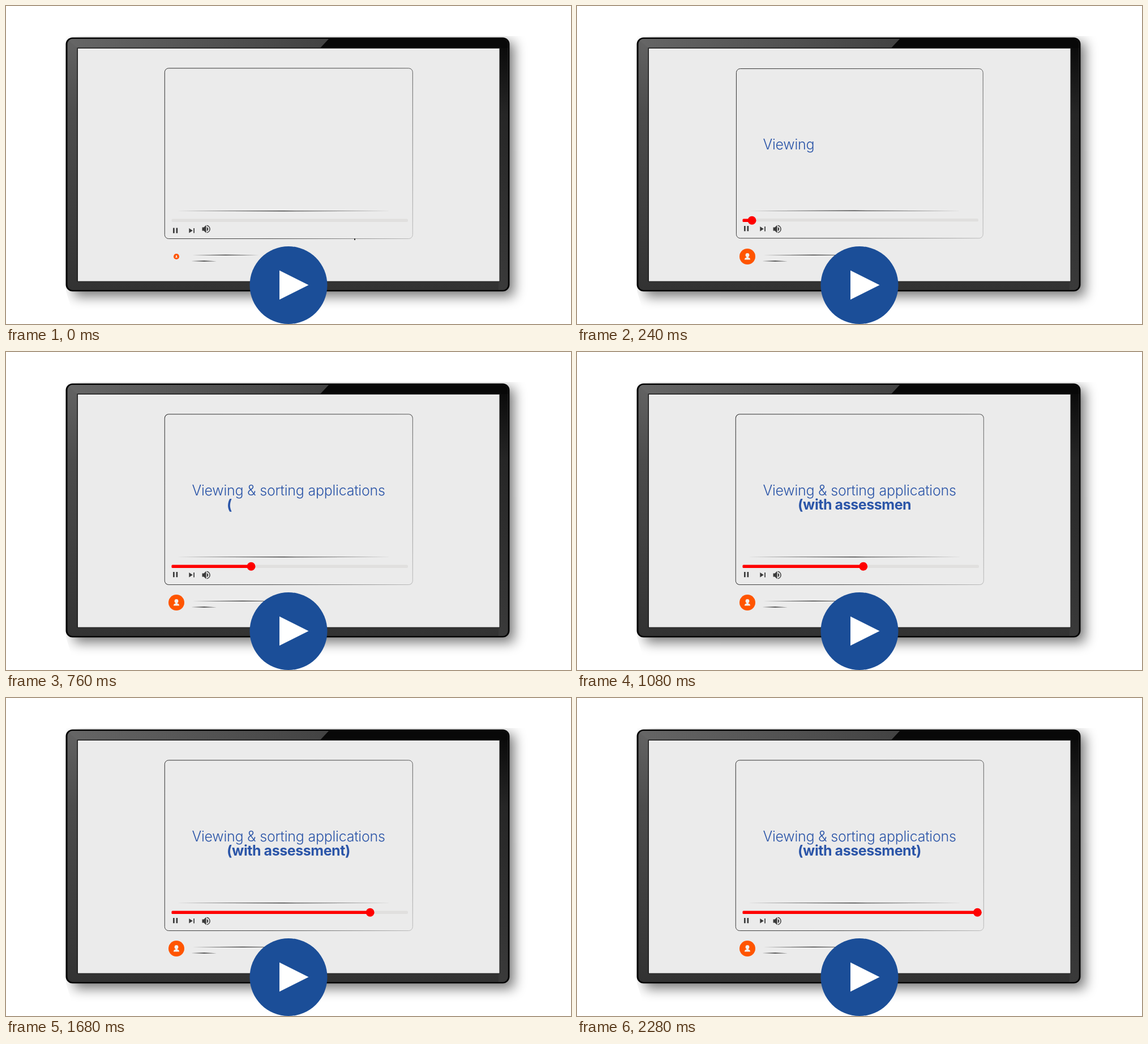
These frames come from a looping animation (998 by 561 pixels, 2.52 s). An HTML page:

```html
<!DOCTYPE html>
<html lang="en">
<head>
<meta charset="utf-8">
<title>Video player</title>
<style>
  html, body { margin: 0; width: 100%; height: 100%; overflow: hidden; background: #fff; }
  svg { display: block; width: 100%; height: 100%; }
  text { font-family: Inter, "Open Sans", sans-serif; font-size: 25px; fill: #2b55a8; text-anchor: middle; white-space: pre; }
  .title { font-weight: 300; letter-spacing: -.25px; }
  .sub { font-weight: 700; letter-spacing: -.45px; }
  .rest { visibility: hidden; }
  .icon { fill: #3a3a3a; }
  .rule { fill: #2a2a2a; }
</style>
</head>
<body>
<svg viewBox="0 0 998 561">
  <defs>
    <linearGradient id="bezel" x1="0" y1="0" x2="0" y2="1">
      <stop offset="0" stop-color="#636363"/>
      <stop offset=".3" stop-color="#4c4c4c"/>
      <stop offset="1" stop-color="#323232"/>
    </linearGradient>
    <linearGradient id="side" x1="0" y1="0" x2="0" y2="1">
      <stop offset="0" stop-color="#080808"/>
      <stop offset=".3" stop-color="#262626"/>
      <stop offset="1" stop-color="#3a3a3a"/>
    </linearGradient>
    <linearGradient id="top" x1="0" y1="0" x2="1" y2="0">
      <stop offset="0" stop-color="#666"/>
      <stop offset="1" stop-color="#424242"/>
    </linearGradient>
    <linearGradient id="edge" gradientUnits="userSpaceOnUse" x1="300" y1="110" x2="718" y2="411">
      <stop offset="0" stop-color="#303030"/>
      <stop offset=".6" stop-color="#4a4a4a"/>
      <stop offset="1" stop-color="#bdbdbd"/>
    </linearGradient>
    <filter id="soft" x="-10%" y="-15%" width="120%" height="130%"><feGaussianBlur stdDeviation="11"/></filter>
    <clipPath id="below"><path d="M106 53H940V545H118L106 503Z"/></clipPath>
    <clipPath id="body"><rect x="108.500" y="58" width="778" height="443" rx="9"/></clipPath>
  </defs>

  <g clip-path="url(#below)">
    <rect x="120" y="64" width="777" height="448" fill="#000" opacity=".55" filter="url(#soft)"/>
  </g>

  <!-- monitor -->
  <rect x="105.500" y="55.500" width="784" height="448" rx="12" fill="#050505"/>
  <g clip-path="url(#body)">
    <rect x="108" y="58" width="779" height="443" fill="url(#bezel)"/>
    <rect x="870" y="58" width="18" height="443" fill="url(#side)"/>
    <path d="M108 58H570L555 74H126Z" fill="url(#top)"/>
    <path d="M570 58H888V74H555Z" fill="#080808"/>
  </g>
  <rect x="125.500" y="73.500" width="747" height="413" fill="#1c1c1c"/>
  <rect x="127" y="75" width="744.500" height="410.500" fill="#ebebeb"/>

  <!-- player -->
  <g id="panel">
    <rect x="280.300" y="109.800" width="438" height="300.700" rx="7" fill="none" stroke="url(#edge)"/>
    <path class="rule" d="M301 361.700L490 361.100L680 361.700L490 362.300Z"/>
    <rect x="292.500" y="375.500" width="417.500" height="5.500" rx="2" fill="#e0dfde"/>
  </g>
  <rect id="tip" x="615" y="410" width="2" height="3" fill="#333"/>

  <g class="icon">
    <path id="pause" d="M295 388h2.700v9.300h-2.700zM300.500 388h2.700v9.300h-2.700z"/>
    <path id="next" d="M323.300 389l6.500 4.200-6.500 4.200zM331.200 389h1.700v8.400h-1.700z"/>
    <path d="M346.500 390.500h3l4-4v14l-4-4h-3z"/>
    <path d="M354.800 390a3.700 3.700 0 0 1 0 7z"/>
    <path d="M354.800 387.200a6.400 6.400 0 0 1 0 12.600" fill="none" stroke="#3a3a3a" stroke-width="1.500"/>
  </g>

  <g id="avatar">
    <circle r="14" fill="#ff5500"/>
    <circle cy="-2.500" r="3.400" fill="#f2f2f2"/>
    <path d="M-5 5.500C-5 2.500-3 2-1.500 1.500V0H1.500V1.500C3 2 5 2.500 5 5.500Z" fill="#f2f2f2"/>
  </g>
  <path class="rule" id="line"/>
  <path class="rule" d="M327 450L350 449.300L372 450.200L350 450.700Z"/>

  <g id="seek" fill="#f00">
    <rect id="bar" x="292.500" y="375.500" height="5.500" rx="1.500"/>
    <circle id="knob" cy="378.200" r="7.500"/>
  </g>

  <text class="title" x="499" y="253"><tspan></tspan><tspan class="rest"></tspan></text>
  <text class="sub" x="499" y="277.500"><tspan></tspan><tspan class="rest"></tspan></text>

  <!-- play badge -->
  <circle cx="499" cy="492.500" r="68.500" fill="#1b4e98"/>
  <path d="M483 466.500L534.500 492.300L483 518Z" fill="#fff"/>
</svg>
<script>
  const LOOP = 2520, STEP = 40, LAST = 2280;
  const TITLE = "Viewing & sorting applications";
  const SUB = "(with assessment)";
  const SEEK = [[160, 293], [240, 309], [480, 366.5], [760, 433], [1440, 587.5], [1880, 689.5], [1960, 707.3]];
  const $ = id => document.getElementById(id);
  const move = (id, value) => $(id).setAttribute("transform", value);
  const clamp = v => Math.max(0, Math.min(1, v));

  function along(points, t) {
    for (let i = 1; i < points.length; i++) {
      const [t0, a] = points[i - 1], [t1, b] = points[i];
      if (t < t1) return a + (b - a) * clamp((t - t0) / (t1 - t0));
    }
    return points[points.length - 1][1];
  }

  function outBack(p) {
    const q = p - 1;
    return 1 + 2.2 * q ** 3 + 1.2 * q ** 2;
  }

  function type(name, text, count) {
    const n = Math.max(0, Math.min(text.length, Math.floor(count)));
    const [shown, rest] = document.querySelectorAll("." + name + " tspan");
    shown.textContent = text.slice(0, n);
    rest.textContent = text.slice(n);
  }

  function draw(t) {
    // damped spring of the player outline
    const s = 1 + 0.04 * Math.exp(-0.0085 * t) * Math.sin(Math.PI * t / 160);
    move("panel", `translate(499.3 260) scale(${s}) translate(-499.3 -260)`);
    $("tip").style.display = t < STEP ? "" : "none";

    const drop = 3.5 * (1 - clamp(t / 160)) ** 2;
    move("pause", `translate(0 ${drop})`);
    move("next", `translate(0 ${drop * 0.85})`);

    const size = 0.36 + 0.64 * outBack(clamp(t / 240));
    move("avatar", `translate(301 442) scale(${size})`);

    const end = 447 + 60 * clamp(t / 160);
    const mid = (329 + end) / 2;
    $("line").setAttribute("d", `M329 439.300L${mid} 438.700L${end} 439.300L${mid} 439.900Z`);

    const x = along(SEEK, t);
    $("seek").style.display = t < 160 ? "none" : "";
    $("bar").setAttribute("width", x - 292.5);
    $("knob").setAttribute("cx", x);

    const typed = (t - 74) * 0.0453;
    type("title", TITLE, typed);
    type("sub", SUB, typed - TITLE.length);
  }

  const start = performance.now();
  let last = -1;
  function tick() {
    const t = (performance.now() - start) % LOOP;
    const step = Math.min(LAST, Math.floor(t / STEP) * STEP);
    if (step !== last) draw(last = step);
    requestAnimationFrame(tick);
  }
  tick();
</script>
</body>
</html>
```
